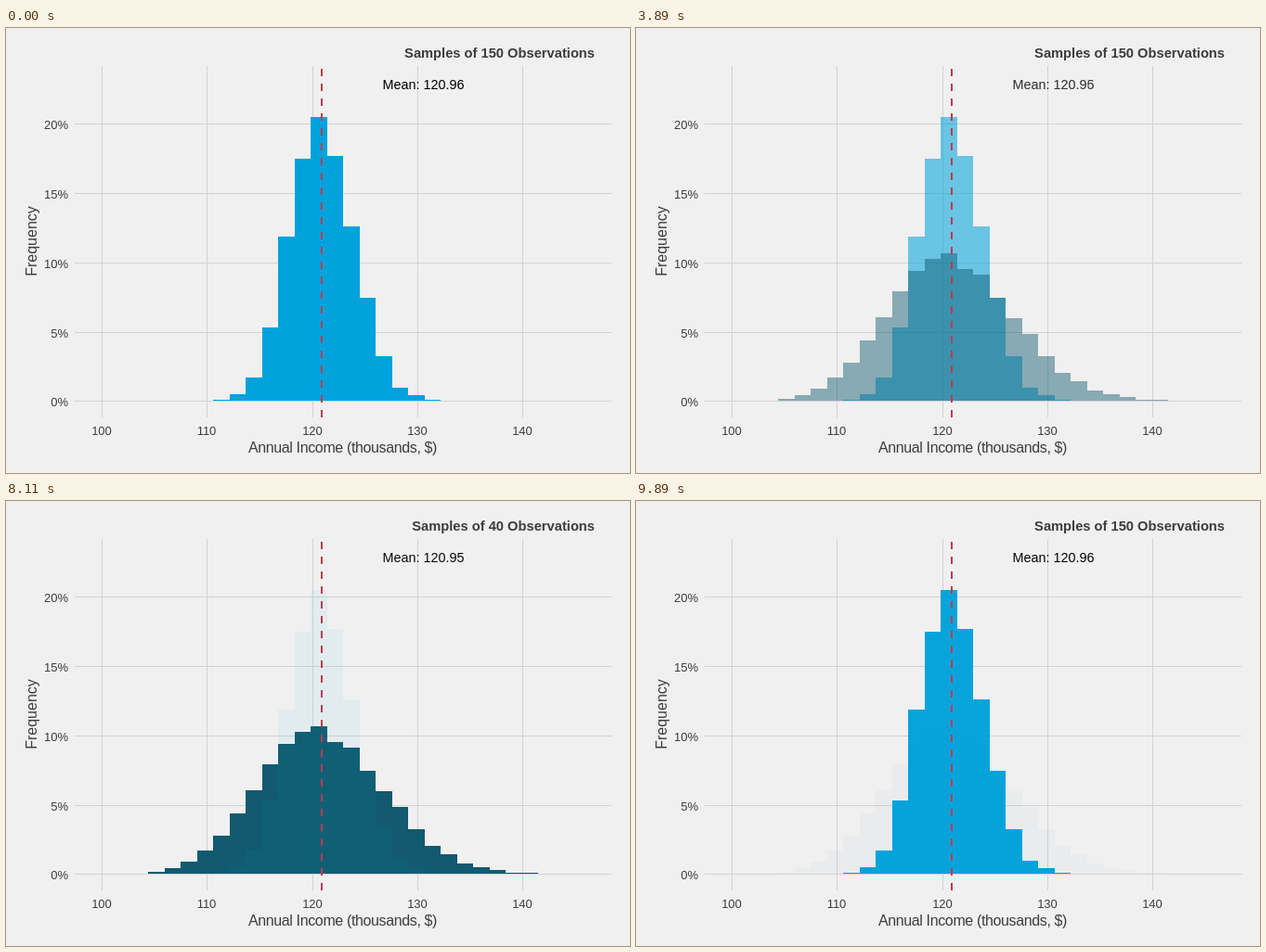
Write an HTML page that moves like this. It is 672 px wide and 480 px high and loops after 10 s.

```html
<!DOCTYPE html>
<html lang="en">
<head>
<meta charset="utf-8">
<title>Sample size histogram</title>
<style>
  html, body { margin: 0; width: 100%; height: 100%; overflow: hidden; background: #f0f0f0; }
  svg { display: block; font-family: "Liberation Sans", Arial, sans-serif; fill: #3c3c3c; }
  path { shape-rendering: crispEdges; }
  #grid { stroke: #d2d2d2; fill: none; }
  .tick { font-size: 13px; }
  .axis { font-size: 16px; text-anchor: middle; }
  .mean { font-size: 14.4px; fill: #000; }
  #title { font-size: 14.7px; font-weight: bold; text-anchor: end; }
</style>
</head>
<body>
<svg width="672" height="480" viewBox="0 0 672 480">
  <path id="grid"/>
  <g id="ticks"></g>
  <g id="bars">
    <path id="blue" fill="#00a2dc"/>
    <path id="teal" fill="#045168"/>
  </g>
  <path d="M340 420V41" stroke="#b83c52" stroke-width="2" stroke-dasharray="8"/>
  <text class="mean" id="blueMean" x="405.5" y="66">Mean: 120.96</text>
  <text class="mean" id="tealMean" x="405.5" y="66">Mean: 120.95</text>
  <text class="axis" x="362.5" y="458" letter-spacing="-.37">Annual Income (thousands, $)</text>
  <text class="axis" transform="translate(33 230) rotate(-90)">Frequency</text>
  <text id="title" x="634" y="32"></text>
</svg>
<script>
const $ = id => document.getElementById(id);
const BASE = 402, FRAME = 10000 / 180;

// Axes
const xTicks = [103, 216, 330, 443, 556];
const yTicks = [402, 328, 253, 178, 103];
$("grid").setAttribute("d",
  xTicks.map(x => `M${x + .5} 41V420`).join("") +
  yTicks.map(y => `M74 ${y + .5}H652`).join(""));
$("ticks").innerHTML =
  xTicks.map((x, i) => `<text class="tick" text-anchor="middle" x="${x}" y="439">${100 + i * 10}</text>`).join("") +
  yTicks.map((y, i) => `<text class="tick" text-anchor="end" x="67" y="${y + 6}">${i * 5}%</text>`).join("");

// Histograms as stepped outlines, given the top of each bin
const binEdge = i => Math.round(153.3 + 17.5 * i);
function outline(id, first, tops) {
  const steps = tops.map((top, i) => `V${top}H${binEdge(first + i + 1)}`).join("");
  $(id).setAttribute("d", `M${binEdge(first)} ${BASE}${steps}V${BASE}Z`);
}
outline("blue", 4, [401, 395, 377, 323, 225, 141, 96, 138, 214, 291, 354, 388, 396, 401]);
outline("teal", 0, [400, 396, 389, 377, 361, 337, 312, 284, 262, 249, 243, 260,
                    266, 291, 313, 330, 354, 372, 381, 391, 395, 398, 401, 401]);

const clamp = v => Math.min(1, Math.max(0, v));

function draw(time) {
  const frame = Math.floor((time % 10000 + 4) / FRAME);
  const returning = frame >= 140;
  const toTeal = clamp((frame - 54) / 36);
  const toBlue = clamp((frame - 144) / 35);
  const teal = returning ? 1 - toBlue : toTeal;

  for (const [id, alpha] of [["teal", teal], ["blue", 1 - teal]]) {
    $(id).style.opacity = alpha;
    $(id + "Mean").style.opacity = alpha;
  }
  // The incoming histogram lies on top
  const top = $(returning ? "blue" : "teal");
  if ($("bars").lastElementChild !== top) $("bars").append(top);

  const size = frame >= 73 && frame < 163 ? 40 : 150;
  $("title").textContent = `Samples of ${size} Observations`;
}

const start = performance.now();
function loop() {
  draw(performance.now() - start);
  requestAnimationFrame(loop);
}
loop();
</script>
</body>
</html>
```
